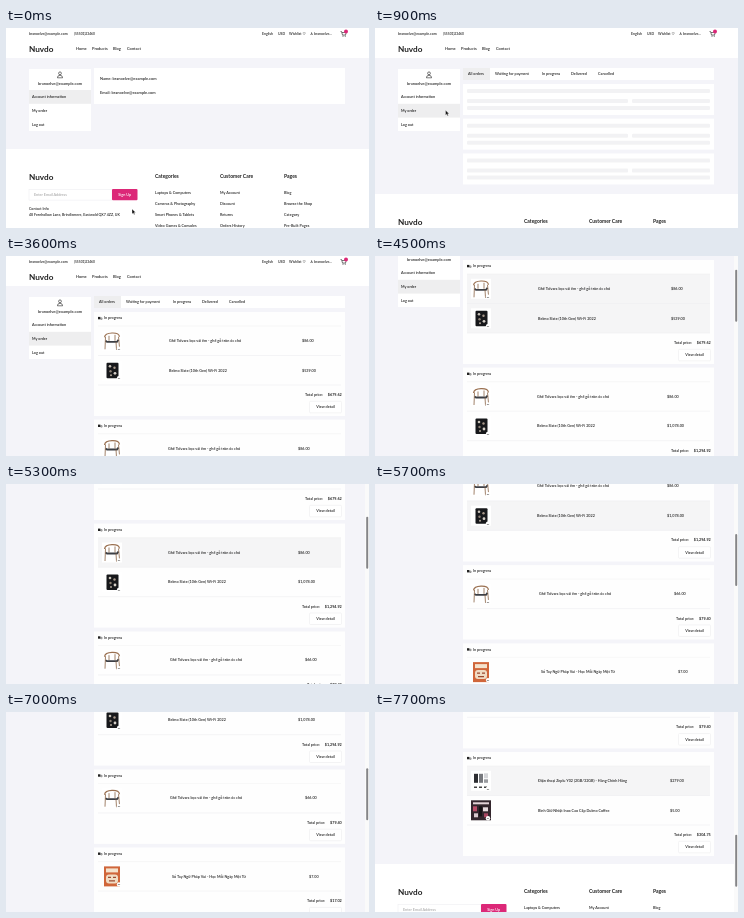
Animation, 363 px wide and 200 px high, one loop 8 s. Source, as an HTML page:

```html
<!DOCTYPE html>
<html lang="en">
<head>
<meta charset="utf-8">
<title>My orders</title>
<style>
  html, body { margin: 0; width: 100%; height: 100%; overflow: hidden; background: #f4f4f9; }
  svg { display: block; width: 100vw; height: 100vh; }
  text { font-family: Lato, "Open Sans", sans-serif; font-size: 3.75px; font-weight: 600; fill: #222; white-space: pre; }
</style>
</head>
<body>
<svg id="stage" viewBox="0 0 363 200" xmlns="http://www.w3.org/2000/svg"></svg>
<script>
const LOOP = 8000, STEP = 100;
const SWITCH = 800, LOADED = 3000, SCROLLING = 4300;
const ROW = 29.5, FOOTER_HEIGHT = 142;
const BRAND = "Nuvdo", EMAIL = "branoelve@example.com";

const rect = (x, y, w, h, fill = "#fff", more = "") =>
  `<rect x="${x}" y="${y}" width="${w}" height="${h}" fill="${fill}" ${more}/>`;
const circle = (x, y, r, fill) => `<circle cx="${x}" cy="${y}" r="${r}" fill="${fill}"/>`;
const path = (d, stroke, width = 1, fill = "none") =>
  `<path d="${d}" stroke="${stroke}" stroke-width="${width}" fill="${fill}"/>`;
const text = (x, y, s, more = "") => `<text x="${x}" y="${y}" ${more}>${s}</text>`;
const size = (px, weight = 600) => `style="font-size:${px}px;font-weight:${weight}"`;
const group = (id, body, y = 0) => `<g id="${id}" transform="translate(0 ${y})">${body}</g>`;

// Product thumbnails, drawn in a 20 x 20 box
const thumbs = {
  chair: rect(0, 0, 20, 20)
    + path("M3.5 10L5 11H15L16.5 9", "#3c3f45", 1.8)
    + path("M3.5 6L3 18.5M16.5 6L17.5 16.5M7 5V10M13 4V10M14 11L14.5 19", "#8a6244", .8)
    + path("M2.5 6.5Q3 2.5 10 2.2T17.5 6", "#9a7050", 1.2),
  tablet: rect(0, 0, 20, 20) + rect(4.5, 2.5, 12, 15.5, "#17181b", 'rx="1"')
    + circle(8, 6, 1.3, "#c9c2b8") + circle(12.5, 7.5, 1.2, "#a8988a") + circle(8.5, 11, 1.2, "#8d8176")
    + circle(13, 13, 1.4, "#d6d0c8") + circle(9, 15, 1, "#b0a498"),
  book: rect(2, 0, 16, 20, "#d0663a") + rect(4, 2, 12, 4, "#f4e2cc")
    + rect(4, 8, 12, 9, "#f0dcc4", 'rx="3"') + path("M6 11H9M11 11H14M7 14.5H13", "#9b4a30", 1.3),
  phone: rect(0, 0, 20, 20) + rect(3, 3, 4, 9, "#2d2e32") + rect(8, 3, 4, 9, "#77797e")
    + rect(13, 2.5, 4, 5, "#d5d6d9") + rect(13, 8.5, 4, 3.5, "#9a9ca0")
    + path("M3 16.5H6M8 16.5H11M13 16.5H16", "#444", 1.5),
  flask: rect(0, 0, 20, 20, "#33262d") + rect(2, 2, 16, 2, "#e3d3d8")
    + rect(2, 6, 4, 5, "#b84d68") + rect(8, 6, 3, 10, "#151215") + rect(12, 7, 5, 4, "#e6dadd")
    + rect(3, 13, 4, 4, "#d9c9ce") + rect(13, 13, 4, 4, "#a84560"),
};

const chairName = "Ghế Tolvara bọc vải êm - ghế gỗ tròn óc chó";
const tabletName = "Belmo Slate (10th Gen) Wi-Fi 2022";
const orders = [
  { nameX: 163, priceX: 296, total: "$679.62",
    rows: [["chair", chairName, "$86.00"], ["tablet", tabletName, "$539.00"]] },
  { nameX: 162, priceX: 292, total: "$1,294.92",
    rows: [["chair", chairName, "$86.00"], ["tablet", tabletName, "$1,078.00"]] },
  { nameX: 164, priceX: 299, total: "$79.40", rows: [["chair", chairName, "$66.00"]] },
  { nameX: 166, priceX: 303, total: "$17.02",
    rows: [["book", "Sổ Tay Ngữ Pháp Vui - Học Mỗi Ngày Một Từ", "$7.00"]] },
  { nameX: 164, priceX: 299, total: "$79.40", rows: [["chair", chairName, "$66.00"]] },
  { nameX: 163, priceX: 295, total: "$304.75",
    rows: [["phone", "Điện thoại Zeplu Y02 (2GB/32GB) - Hàng Chính Hãng", "$279.00"],
           ["flask", "Bình Giữ Nhiệt Inox Cao Cấp Dulmo Coffee", "$5.00"]] },
];

const rowTops = [];

function orderCard(order, top) {
  const bottom = top + 14 + order.rows.length * ROW;
  let out = rect(88, top, 251, bottom - top + 31, "#fefefe")
    + rect(92, top + 4.9, 2.4, 2.4, "#222") + path(`M94.8 ${top + 5.9}h1.3v1.5h-1.3z`, "#222", .4)
    + text(98, top + 7.3, "In progress") + path(`M92 ${top + 14}H335`, "#eee", .5);
  order.rows.forEach(([kind, name, price], i) => {
    const y = top + 14 + i * ROW;
    rowTops.push(y);
    out += rect(92, y, 243, ROW, "#eeeeef", 'class="row"')
      + `<g transform="translate(96 ${y + 4.8})">${thumbs[kind]}</g>`
      + circle(113, y + 22.8, 2.2, "#fff")
      + text(113, y + 23.7, "x1", `text-anchor="middle" ${size(2.4)}`)
      + text(order.nameX, y + 16, name) + text(order.priceX, y + 16, price)
      + path(`M92 ${y + ROW}H335`, "#e9e9ec", .5);
  });
  return out
    + text(335.8, bottom + 11, `Total price:<tspan dx="4.8" font-weight="700">${order.total}</tspan>`, 'text-anchor="end"')
    + rect(303.5, bottom + 16.3, 32, 11.5, "#fff", 'stroke="#ececef" stroke-width=".6" rx="1"')
    + text(319.5, bottom + 23.4, "View detail", 'text-anchor="middle"');
}

function orderList() {
  let top = 56, out = "";
  for (const order of orders) {
    out += orderCard(order, top);
    top += 48.7 + order.rows.length * ROW;
  }
  return out;
}

const header = rect(0, 0, 363, 30)
  + text(23, 6.8, EMAIL, size(3.5)) + text(68, 6.8, "(55501)23460", size(3.3))
  + text(256, 6.8, "English", size(3.5)) + text(272, 6.8, "USD", size(3.5))
  + text(283, 6.8, "Wishlist ♡", size(3.5)) + text(304, 6.8, "♙ branoelve...", size(3.5))
  + path("M334.5 3.5h1l1 3.5h3l.7-2.5h-4.3", "#222", .6)
  + circle(337, 8, .6, "#222") + circle(339.3, 8, .6, "#222") + circle(340, 3.5, 2, "#db2777")
  + text(23, 23.8, BRAND, size(8.2, 700))
  + [["Home", 70], ["Products", 86], ["Blog", 107], ["Contact", 121]]
      .map(([s, x]) => text(x, 22.2, s, size(4))).join("");

const sidebar = rect(23, 41, 62, 62)
  + rect(23, 62, 62, 13.8, "#eeeeef", 'id="active"')
  + `<circle cx="54" cy="45.3" r="1.4" fill="none" stroke="#222" stroke-width=".6"/>`
  + path("M51.4 49.8q0-2.5 2.6-2.5t2.6 2.5z", "#222", .6)
  + text(54, 56.5, EMAIL, `text-anchor="middle" ${size(4)}`)
  + text(26, 70, "Account information") + text(26, 83.7, "My order") + text(26, 97.5, "Log out");

const account = rect(88, 40, 251, 36)
  + text(94, 52, "Name: " + EMAIL, size(4)) + text(94, 66, "Email: " + EMAIL, size(4));

const tabs = rect(88, 40, 251, 12) + rect(88, 40, 27, 12, "#eeeeef")
  + [["All orders", 93], ["Waiting for payment", 120], ["In progress", 167], ["Delivered", 196], ["Cancelled", 223]]
      .map(([s, x]) => text(x, 47.2, s)).join("");

const cardTops = [56, 90.7, 125.4];
const bar = (x, y, w) => rect(x, y, w, 4, "#efeff1", 'rx="1"');
const skeleton = cardTops.map(y => rect(88, y, 251, 31)).join("")
  + group("bars", cardTops.map(y =>
      bar(92, y + 5, 243) + bar(92, y + 15, 161) + bar(257, y + 15, 78) + bar(92, y + 22, 243)).join(""));

const columns = [
  [149, "Categories", "Laptops &amp; Computers", "Cameras &amp; Photography", "Smart Phones &amp; Tablets", "Video Games &amp; Consoles"],
  [214, "Customer Care", "My Account", "Discount", "Returns", "Orders History"],
  [278, "Pages", "Blog", "Browse the Shop", "Category", "Pre-Built Pages"],
];
const footer = rect(0, 0, 363, FOOTER_HEIGHT)
  + text(23, 31.4, BRAND, size(8.2, 700))
  + rect(23, 40.3, 83, 10.8, "#fff", 'stroke="#ececf0" stroke-width=".5"')
  + text(28, 46.8, "Enter Email Address", 'style="fill:#aaa"')
  + rect(106, 40, 25.5, 11.3, "#dc2878", 'rx="1"')
  + text(118.7, 47, "Sign Up", 'text-anchor="middle" style="fill:#fff"')
  + text(23, 61.3, "Contact Info", size(3.6))
  + text(23, 66.6, "48 Fernhollow Lane, Brindlemere, Eastwold QX7 4ZZ, UK", size(3.6))
  + columns.map(([x, title, ...links]) => text(x, 29.2, title, size(5, 700))
      + links.map((s, i) => text(x, 45.4 + i * 10.8, s)).join("")).join("");

stage.innerHTML = group("page", header + sidebar + group("account", account)
    + group("tabs", tabs) + group("skeleton", skeleton) + group("orders", orderList())
    + group("footer", footer))
  + group("scrollbar", rect(359, 0, 4, 200, "#fafafa") + rect(360.2, 0, 2, 52, "#858588", 'id="thumb" rx="1"'))
  + `<g id="cursor"><path d="M0 0V5L1.2 3.9L2.1 5.7L2.9 5.3L2.1 3.6H3.7Z" fill="#111" stroke="#fff" stroke-width=".35"/></g>`;

const $ = id => document.getElementById(id);
const rows = [...document.querySelectorAll(".row")];

// Linear path through [time, ...values] points
function follow(points, t) {
  let i = points.findIndex(p => p[0] > t);
  if (i < 0) return points.at(-1).slice(1);
  if (i === 0) return points[0].slice(1);
  const a = points[i - 1], b = points[i], k = (t - a[0]) / (b[0] - a[0]);
  return a.slice(1).map((v, j) => v + (b[j + 1] - v) * k);
}

const scrollPath = [[4200, 0], [4500, 52], [4900, 92], [5300, 124], [6000, 240], [6100, 240],
  [6300, 220], [6600, 220], [7000, 214], [7500, 445], [7700, 466]];
const cursorPath = [[0, 126, 181], [199, 126, 181], [200, 74, 69], [300, 74, 69], [800, 70, 82],
  [1200, 72, 83], [1700, 127.5, 81.5], [2000, 127.5, 81.5], [2700, 228, 65]];

const scrollAt = t => follow(scrollPath, t)[0];
const show = (id, on) => $(id).setAttribute("display", on ? "inline" : "none");
const move = (id, x, y) => $(id).setAttribute("transform", `translate(${x} ${y})`);

function hovered(top, t) {
  if (t < LOADED) return 0;
  const y = follow(cursorPath, t)[1] + scrollAt(t);
  return y >= top && y < top + ROW ? 1 : 0;
}

function draw(t) {
  const onOrders = t >= SWITCH, loaded = t >= LOADED, scroll = scrollAt(t);
  const footerTop = loaded ? 618 : onOrders ? 166 : 121;
  show("account", !onOrders);
  show("tabs", onOrders);
  show("skeleton", onOrders && !loaded);
  show("orders", loaded);
  show("scrollbar", t >= SCROLLING);
  show("cursor", !loaded);
  $("active").setAttribute("y", onOrders ? 75.8 : 62);
  $("bars").setAttribute("opacity", .8 + .2 * Math.cos((t - 2000) / 1500 * 2 * Math.PI));
  rows.forEach((row, i) =>
    row.setAttribute("opacity", (hovered(rowTops[i], t) + hovered(rowTops[i], t - 150)) / 2));
  move("page", 0, -scroll);
  move("footer", 0, footerTop);
  move("thumb", 0, scroll * 200 / (footerTop + FOOTER_HEIGHT));
  move("cursor", ...follow(cursorPath, t));
}

function tick() {
  draw(Math.floor(performance.now() % LOOP / STEP) * STEP);
  requestAnimationFrame(tick);
}
tick();
</script>
</body>
</html>
```
